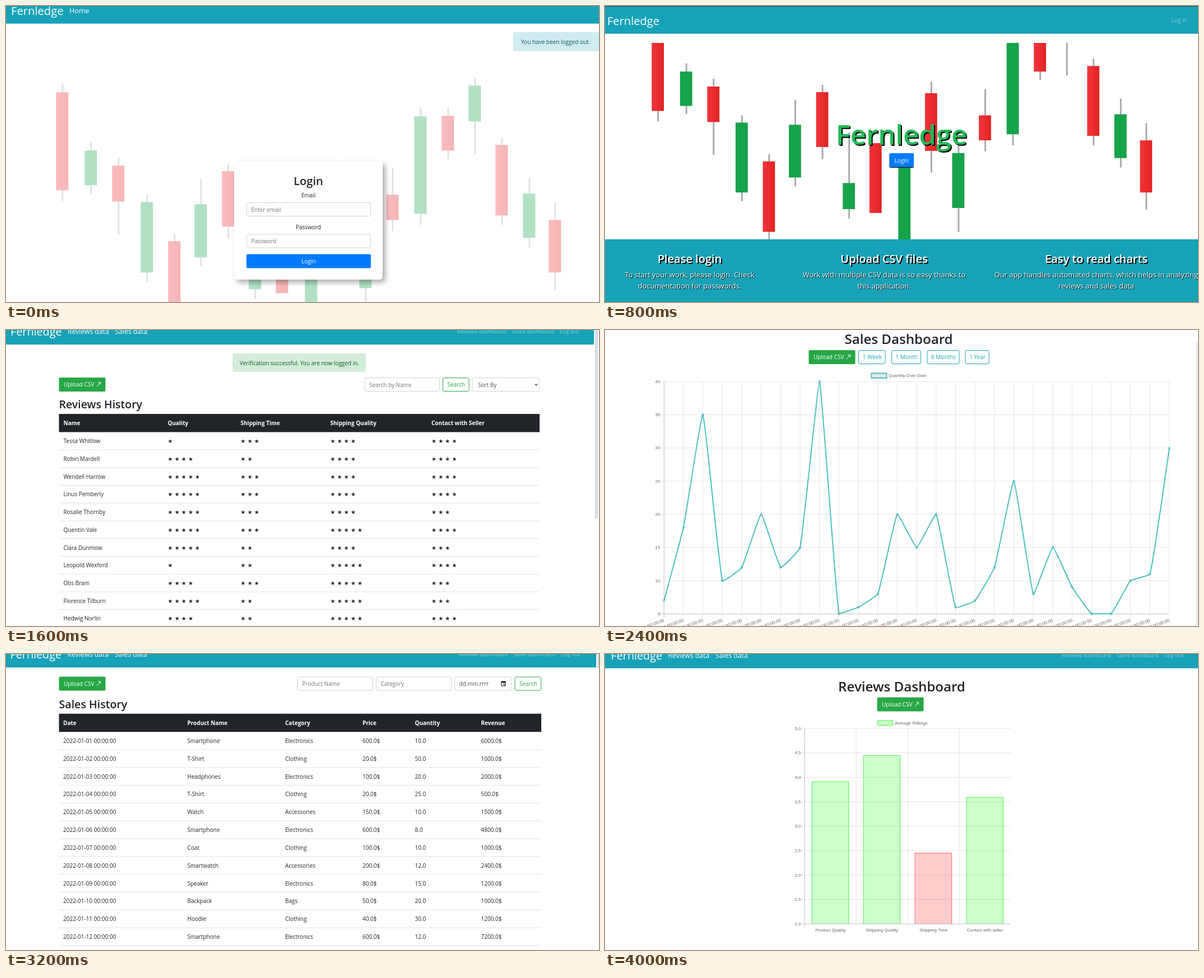
Animation of 1058 by 529 pixels, one loop 4.8 s. Source, as an HTML page:

```html
<!DOCTYPE html>
<html lang="en">
<head>
<meta charset="utf-8">
<title>Sales and reviews dashboard</title>
<style>
html, body { margin: 0; width: 100%; height: 100%; overflow: hidden; background: #fff; }
svg { display: block; width: 1058px; height: 529px; }
text { font-family: "Open Sans", "Noto Sans", sans-serif; white-space: pre; }
.chart text { font-family: "Liberation Sans", Arial, sans-serif; }
.stars { font-family: "DejaVu Sans", sans-serif; }
.card { filter: drop-shadow(5px 5px 5px rgba(0,0,0,.32)); }
.deep { filter: drop-shadow(2px 2px .5px #000); }
.soft { filter: drop-shadow(1px 1px .5px #000); }
.raised { filter: drop-shadow(0 1px .5px #000); }
</style>
</head>
<body>
<svg id="stage" viewBox="0 0 1058 529"></svg>
<script>
const BRAND = 'Fernledge', TEAL = '#17a2b8', GREEN = '#28a745', BLUE = '#007bff';
const INK = '#212529', MUTED = '#6c757d', BORDER = '#ced4da', GRID = '#e5e5e5', AXIS = '#bfbfbf';
const HOLD = 800;

const rect = (x, y, w, h, fill, more = '') =>
  `<rect x="${x}" y="${y}" width="${w}" height="${h}" fill="${fill}" ${more}/>`;
const line = (x1, y1, x2, y2, color = GRID, width = 1) =>
  `<path d="M${x1} ${y1}L${x2} ${y2}" stroke="${color}" stroke-width="${width}"/>`;
const text = (x, y, s, size = 10, fill = INK, more = '') =>
  `<text x="${x}" y="${y}" font-size="${size}" fill="${fill}" ${more}>${s}</text>`;
const MID = 'text-anchor="middle"', END = 'text-anchor="end"', SEMI = 'font-weight="600"';
const centered = (x, y, s, size, fill, more = '') => text(x, y, s, size, fill, MID + ' ' + more);
const box = (x, y, w, h, fill, stroke) =>
  rect(x + .5, y + .5, w - 1, h - 1, fill, `rx="2.5" stroke="${stroke}"`);
const field = (x, y, w, label, color = MUTED) =>
  box(x, y, w, 25, '#fff', BORDER) + text(x + 8.5, y + 16.5, label, 10, color);
const button = (x, y, w, label, color) =>
  box(x, y, w, 25, '#fff', color) + centered(x + w / 2 + .5, y + 16.3, label, 10, color);
const solid = (x, y, w, label) =>
  rect(x, y, w, 25, BLUE, 'rx="2.5"') + centered(x + w / 2, y + 16.5, label, 10, '#fff');

function uploadButton(x, y) {
  return rect(x, y, 83, 25, GREEN, 'rx="2.5"') + text(x + 8.5, y + 16.3, 'Upload CSV', 10.1, '#fff') +
    `<path d="M${x + 67.5} ${y + 16}l6 -7m-4 -.3h4.3v4" fill="none" stroke="#fff"/>`;
}

function navbar(x, y, height, width, right) {
  const links = ['Reviews dashboard', 'Sales dashboard', 'Log out'];
  return rect(0, 0, width, height, TEAL) + text(x, y, BRAND, 19.8, '#fff') +
    text(x + 102, y - 3, 'Reviews data', 12.2, '#fff') +
    text(x + 186.5, y - 3, 'Sales data', 12.2, '#fff') +
    links.map((s, i) => text(right + [0, 98, 183][i], y - 4, s, 9.75, '#fff', 'opacity=".5"')).join('');
}

// Candles: centre, wick top, body top, body bottom, wick bottom; colours alternate.
const CANDLES = [
  [100, 138, 154, 329, 348], [151, 243, 258, 320, 335], [200, 271, 285, 349, 408],
  [251, 337, 350, 476, 492], [300, 407, 420, 547, 565], [347, 309, 354, 449, 465],
  [396, 282, 295, 394, 416], [444, 368, 459, 506, 523], [492, 387, 387, 513, 513],
  [544, 420, 420, 570, 570], [592, 276, 297, 401, 440], [641, 385, 405, 504, 547],
  [689, 290, 337, 382, 402], [739, 181, 197, 371, 391], [788, 181, 196, 258, 273],
  [836, 128, 142, 206, 265], [884, 235, 248, 374, 391], [933, 307, 335, 414, 431],
  [979, 351, 382, 476, 507]
];
const candles = CANDLES.map(([x, top, open, close, low], i) =>
  line(x + .5, top, x + .5, low, '#a4a5a7', 2.8) +
  rect(x - 11, open, 22, close - open, i % 2 ? '#17a34a' : 'url(#red)')).join('');

function loginPage() {
  return `<g opacity=".33" transform="translate(.3 .3)">${candles}</g>` +
    rect(0, 0, 1058, 31.5, TEAL) + text(9, 16, BRAND, 20.2, '#fff') + text(113, 13, 'Home', 12.6, '#fff') +
    box(905, 47, 153, 33.5, '#d1ecf1', '#bee5eb') + text(919, 68, 'You have been logged out.', 10.03, '#0c5460') +
    rect(407, 277, 265, 212, '#fff', 'rx="5" class="card"') +
    centered(539.5, 320, 'Login', 20.1, INK, SEMI) +
    centered(539.5, 342, 'Email') + field(429, 351, 222, 'Enter email') +
    centered(539.5, 398.5, 'Password') + field(429, 407.5, 222, 'Password') +
    solid(429, 443.5, 222, 'Login');
}

function homePage() {
  const pitch = (x, title, ...lines) =>
    centered(x, 459, title, 20, '#fff', SEMI + ' class="deep"') +
    lines.map((s, i) => centered(x, 485 + 20 * i, s, 12.95, '#fff', 'class="soft"')).join('');
  return rect(0, 0, 1058, 49, TEAL) + rect(0, 0, 1058, 1, '#24474f') + rect(0, 48.5, 1058, 1, '#168da0') +
    text(4, 34, BRAND, 20.1, '#fff') + text(1010, 29, 'Log in', 10.3, '#fff', 'opacity=".5"') +
    `<g clip-path="url(#hero)"><g transform="matrix(.991 0 0 .991 -4.9 -138.5)">${candles}</g></g>` +
    centered(529, 247.5, BRAND, 49, '#22b957', SEMI + ' class="deep"') +
    `<g class="raised">${solid(507.5, 263, 43.5, 'Login')}</g>` +
    rect(0, 417, 1058, 112, TEAL) +
    pitch(151, 'Please login', 'To start your work, please login. Check', 'documentation for passwords.') +
    pitch(498, 'Upload CSV files', 'Work with multiple CSV data is so easy thanks to', 'this application.') +
    pitch(876.5, 'Easy to read charts', 'Our app handles automated charts, which helps in analyzing', 'reviews and sales data');
}

function table(x, y, w, pitch, columns, heads, rows) {
  const cells = (row, base, more) => row.map((s, i) => text(columns[i], base, s, 10, ...more(s))).join('');
  return rect(x, y, w, 32.5, INK) +
    cells(heads, y + 20, () => ['#fff', 'font-weight="700"']) +
    rows.map((row, i) =>
      cells(row, y + 52.3 + pitch * i, s => [INK, s[0] === '★' ? 'class="stars"' : '']) +
      line(x, y + 64.3 + pitch * i, x + w, y + 64.3 + pitch * i, '#dee2e6')).join('');
}

function reviewsPage() {
  const reviews = {
    'Tessa Whitlow': '1344', 'Robin Mardell': '4244', 'Wendell Harrow': '5344', 'Linus Pemberly': '5344',
    'Rosalie Thornby': '5343', 'Quentin Vale': '5354', 'Clara Dunmow': '5243', 'Leopold Wexford': '1254',
    'Otis Bram': '4353', 'Florence Tilburn': '5253', 'Hedwig Norlin': '4254'
  };
  const rows = Object.entries(reviews).map(([name, marks]) =>
    [name, ...[...marks].map(n => Array(+n).fill('★').join(' '))]);
  return navbar(8, 10, 26, 1049, 805) + rect(1051, 0, 5, 337, '#d3dae4') +
    box(404.5, 42, 237, 32.5, '#d4edda', '#c3e6cb') +
    centered(523.5, 62.5, 'Verification successful. You are now logged in.', 10, '#155724') +
    uploadButton(94.5, 85) + field(639.5, 85, 134.5, 'Search by Name') + button(779, 85, 47.5, 'Search', GREEN) +
    box(831.5, 85, 120.5, 25, '#fff', BORDER) + text(842, 101.5, 'Sort By', 10, '#495057') +
    '<path d="M943.5 96.5l2.5 2.5 2.5 -2.5" fill="none" stroke="#343a40" stroke-width="1.2"/>' +
    text(94.5, 140, 'Reviews History', 19.5, INK, SEMI) +
    table(94.5, 150, 857.5, 31.7, [102.5, 288.5, 418.5, 578.5, 759],
      ['Name', 'Quality', 'Shipping Time', 'Shipping Quality', 'Contact with Seller'], rows);
}

function legend(x, y, label, fill, stroke, width) {
  return rect(x, y, 27, 8.5, fill, `stroke="${stroke}" stroke-width="${width}"`) +
    text(x + 30.5, y + 7, label, 7.9, '#666');
}

// Cardinal-like spline whose handles shrink with distance and stay between top and bottom.
function smoothPath(pts, tension, top, bottom) {
  const clamp = y => Math.min(bottom, Math.max(top, y));
  const handles = pts.map(([x, y], i) => {
    const a = pts[i - 1] || [x, y], b = pts[i + 1] || [x, y];
    const before = Math.hypot(x - a[0], y - a[1]), after = Math.hypot(b[0] - x, b[1] - y);
    const handle = k => [x + k * (b[0] - a[0]), clamp(y + k * (b[1] - a[1]))];
    const unit = tension / (before + after);
    return { back: handle(-unit * before), ahead: handle(unit * after) };
  });
  return 'M' + pts[0] + pts.slice(1).map((p, i) =>
    `C${handles[i].ahead} ${handles[i + 1].back} ${p}`).join('');
}

function salesChartPage() {
  const values = [7, 18, 35, 10, 12, 20, 12, 15, 40, 5, 6, 8, 20, 15, 20, 6, 7, 12, 25, 8, 15, 9, 5, 5, 10, 11, 30];
  const yOf = v => 507.3 - (v - 5) * 11.86;
  const pts = values.map((v, i) => [105.3 + i * 34.68, yOf(v)]);
  let grid = '';
  for (let v = 5; v <= 40; v += 5)
    grid += line(98.5, yOf(v), 1007, yOf(v), v > 5 ? GRID : AXIS) + text(98.5, yOf(v) + 2.5, v, 8, '#666', END);
  pts.forEach(([x], i) => {
    const day = String(i + 1).padStart(2, '0');
    grid += line(x, 92, x, 513, i ? GRID : AXIS) +
      text(0, 0, `2022-01-${day} 00:00:00`, 8, '#666', `${END} transform="translate(${x + 1} 521) rotate(-20)"`);
  });
  const ranges = [['1 Week', 452, 48.5], ['1 Month', 511, 53], ['6 Months', 574.5, 58], ['1 Year', 642.5, 43]];
  return centered(524, 25, 'Sales Dashboard', 24.1, INK, SEMI) + uploadButton(363.5, 36) +
    ranges.map(([s, x, w]) => button(x, 36, w, s, TEAL)).join('') +
    rect(1055.5, 22, 1.5, 507, '#d3dae4') +
    `<g class="chart">${legend(475.5, 77.3, 'Quantity Over Date', '#e5e5e5', '#4bc0c0', 2)}${grid}</g>` +
    `<path d="${smoothPath(pts, .1, yOf(40), yOf(5))}" fill="none" stroke="#4bc0c0" stroke-width="2"/>` +
    pts.map(([x, y]) => `<circle cx="${x}" cy="${y}" r="2" fill="#0001" stroke="#4bc0c0" stroke-width=".7"/>`).join('');
}

function salesPage() {
  const sales = [
    ['Smartphone', 'Electronics', 600, 10], ['T-Shirt', 'Clothing', 20, 50], ['Headphones', 'Electronics', 100, 20],
    ['T-Shirt', 'Clothing', 20, 25], ['Watch', 'Accessories', 150, 10], ['Smartphone', 'Electronics', 600, 8],
    ['Coat', 'Clothing', 100, 10], ['Smartwatch', 'Accessories', 200, 12], ['Speaker', 'Electronics', 80, 15],
    ['Backpack', 'Bags', 50, 20], ['Hoodie', 'Clothing', 40, 30], ['Smartphone', 'Electronics', 600, 12]
  ];
  const rows = sales.map(([name, kind, price, count], i) =>
    [`2022-01-${String(i + 1).padStart(2, '0')} 00:00:00`, name, kind, price + '.0$', count + '.0', price * count + '.0$']);
  return navbar(7.5, 8, 24, 1053, 807.5) + rect(1055, 0, 3, 25, '#d3dae4') +
    uploadButton(94.5, 40.5) + field(520, 40.5, 135, 'Product Name') + field(660, 40.5, 135, 'Category') +
    field(800, 40.5, 102.5, 'dd.mm.rrrr', '#495057') +
    rect(884, 49.5, 7, 7.5, 'none', 'stroke="#111" stroke-width="1"') + rect(883.5, 49, 8, 2.5, '#111') +
    rect(887.5, 53.5, 2, 2, '#111') + rect(885, 48, 1, 2, '#111') + rect(889, 48, 1, 2, '#111') +
    button(907.5, 40.5, 47.5, 'Search', GREEN) +
    text(94.5, 97, 'Sales History', 19.6, INK, SEMI) +
    table(94.5, 106.7, 860.5, 31.83, [102, 323.5, 498, 636, 729.5, 847.5],
      ['Date', 'Product Name', 'Category', 'Price', 'Quantity', 'Revenue'], rows);
}

function reviewsChartPage() {
  const yOf = v => 482.3 - (v - 1) * 87.3;
  const bars = [['Product Quality', 3.91], ['Shipping Quality', 4.45], ['Shipping Time', 2.45], ['Contact with seller', 3.59]];
  let chart = legend(486.5, 119, 'Average Ratings', '#cfc', '#4bf44b', 1);
  for (let v = 1; v <= 5; v += .5)
    chart += line(350, yOf(v), 724, yOf(v), v > 1 ? GRID : AXIS) +
      text(349.5, yOf(v) + 2.5, v.toFixed(1).replace('.', ','), 8, '#666', END);
  bars.forEach(([label, v], i) => {
    const x = 356.3 + 91.9 * i, y = yOf(v), low = v < 3;
    chart += line(x, 133, x, 488, i ? GRID : AXIS) + centered(x + 46, 496, label, 7.95, '#666') +
      `<path d="M${x + 13} 482.3V${y}h65.5V482.3" fill="${low ? '#f003' : '#0f03'}" stroke="${low ? '#f66' : '#4bf44b'}"/>`;
  });
  return navbar(10.5, 10, 25.5, 1058, 815) + centered(529.5, 67, 'Reviews Dashboard', 24.1, INK, SEMI) +
    uploadButton(485.5, 77.5) + `<g class="chart">${chart}</g>`;
}

const pages = [loginPage, homePage, reviewsPage, salesChartPage, salesPage, reviewsChartPage];
const stage = document.getElementById('stage');
stage.innerHTML = `<defs>
  <linearGradient id="red"><stop stop-color="#f0343c"/><stop offset="1" stop-color="#e02424"/></linearGradient>
  <clipPath id="hero">${rect(0, 66, 1058, 351, '#000')}</clipPath>
</defs>` + pages.map(page => `<g class="page" display="none">${page()}</g>`).join('');

const views = stage.querySelectorAll('.page'), start = performance.now();
function tick() {
  const now = Math.floor((performance.now() - start) / HOLD) % views.length;
  views.forEach((view, i) => view.setAttribute('display', i === now ? 'inline' : 'none'));
  requestAnimationFrame(tick);
}
tick();
</script>
</body>
</html>
```
